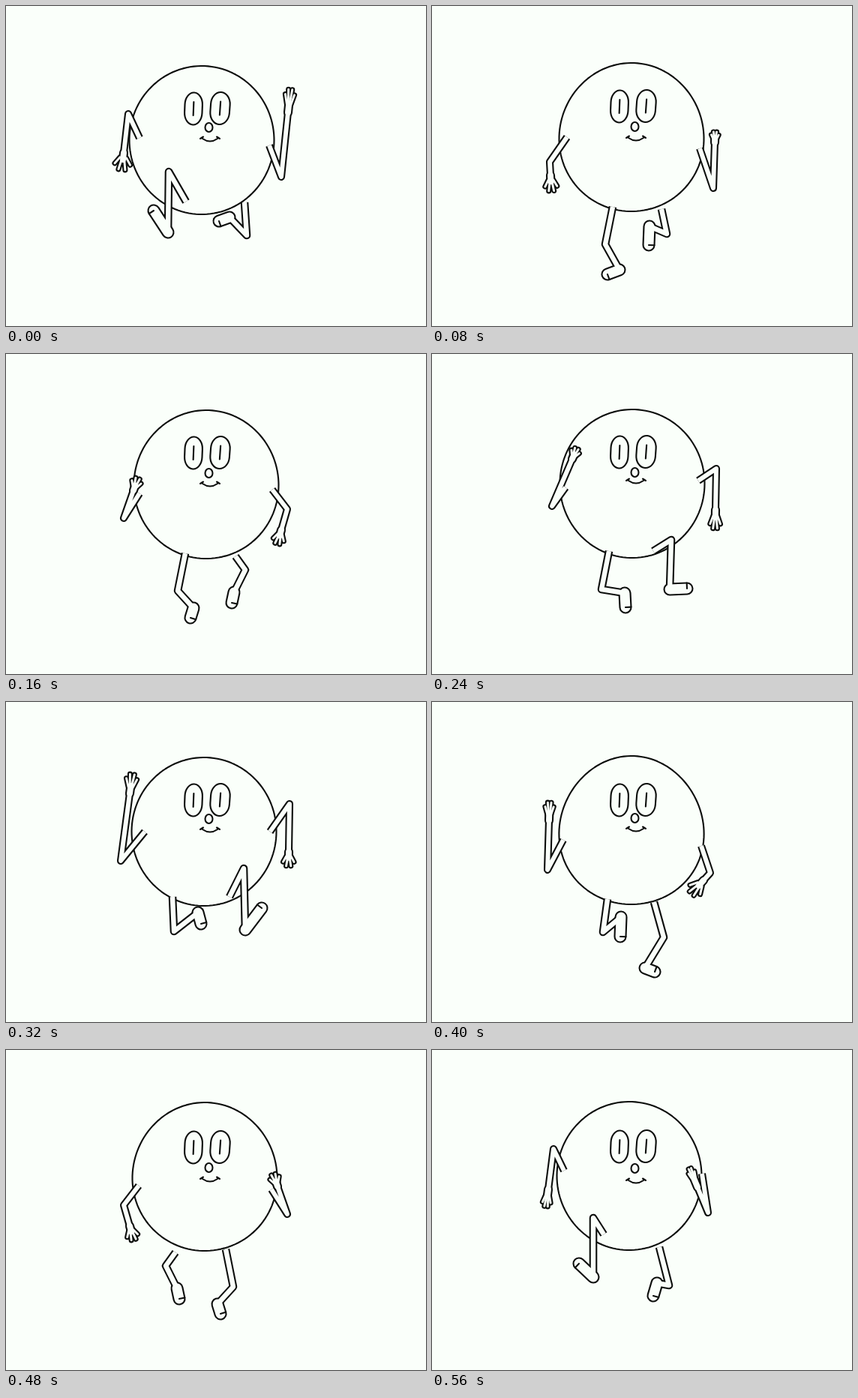
Animation, 560 px wide and 427 px high, one loop 0.64 s. Source, as an HTML page with a canvas:

```html
<!DOCTYPE html>
<html lang="en">
<head>
<meta charset="utf-8">
<title>Running ball</title>
<style>
html, body { margin: 0; width: 100%; height: 100%; overflow: hidden; background: #fafffa; }
canvas { display: block; }
</style>
</head>
<body>
<canvas id="stage" width="560" height="427"></canvas>
<script>
const STEP = 80, PAPER = '#fafffa', INK = '#0c0e0c', LINE = 2.1;
const MIRROR_SUM = 532;
const BODY_RX = 96.5, BODY_RY = 99;
const ARM = 8, PALM = 10, FINGER = 5, LEG = 8.5, FOOT = 15;
const ctx = document.getElementById('stage').getContext('2d');

// body: centre x, centre y, sag    face: height of eyes, nose, mouth
// arms: shoulder, elbow, wrist, hand length, finger spread
// legs: hip, knee, ankle, toe
const poses = [
  {
    body: [261, 179, 0], face: [137, 162, 177],
    arms: [[178, 176, 163, 144, 157, 196, 26, .6], [351, 186, 367, 228, 376, 142, 34, .25]],
    legs: [[240, 261, 217, 221, 216, 302, 197, 273], [318, 262, 321, 306, 298, 282, 284, 287]]
  },
  {
    body: [266, 175, .02], face: [134, 161, 176],
    arms: [[180, 175, 157, 208, 158, 226, 24, .5], [357, 190, 375, 243, 377, 182, 17, .45]],
    legs: [[241, 268, 231, 318, 250, 352, 234, 358], [306, 271, 313, 304, 290, 294, 289, 319]]
  },
  {
    body: [267, 174, .01], face: [132, 159, 173],
    arms: [[178, 186, 157, 219, 170, 182, 20, .5], [355, 181, 375, 207, 367, 235, 22, .5]],
    legs: [[239, 266, 229, 316, 250, 339, 246, 352], [306, 270, 319, 288, 304, 318, 301, 332]]
  },
  {
    body: [267, 173, 0], face: [131, 158, 169],
    arms: [[178, 178, 160, 203, 187, 140, 18, .5], [355, 169, 379, 153, 378, 208, 28, .35]],
    legs: [[236, 263, 226, 314, 257, 319, 258, 338], [295, 263, 319, 248, 317, 314, 340, 313]]
  },
  {
    body: [264, 173, 0], face: [131, 156, 170],
    arms: [[185, 173, 153, 212, 165, 122, 29, .35], [352, 173, 378, 136, 377, 200, 22, .5]],
    legs: [[222, 260, 224, 306, 256, 281, 260, 296], [298, 260, 317, 222, 319, 304, 341, 275]]
  },
  {
    body: [266, 171, .05], face: [131, 155, 169],
    arms: [[175, 184, 154, 224, 156, 158, 27, .3], [359, 192, 371, 228, 362, 238, 27, .5]],
    legs: [[234, 263, 228, 307, 252, 287, 251, 313], [296, 267, 309, 314, 284, 355, 297, 360]]
  },
  {
    body: [265, 169, .02], face: [130, 157, 172]
  },
  {
    body: [263, 168, 0], face: [129, 158, 174],
    arms: [[176, 161, 162, 132, 155, 186, 26, .3], [360, 165, 368, 217, 354, 183, 30, .2]],
    legs: [[229, 246, 215, 224, 215, 303, 196, 285], [303, 263, 316, 314, 300, 311, 295, 328]]
  }
];

// Half a cycle later the same stride is taken by the other side.
const mirrorPoint = (v, i) => i < 6 && i % 2 === 0 ? MIRROR_SUM - v : v;
poses[6].arms = poses[2].arms.map(arm => arm.map(mirrorPoint)).reverse();
poses[6].legs = poses[2].legs.map(leg => leg.map((v, i) => i % 2 ? v : MIRROR_SUM - v)).reverse();

function line(...coords) {
  const path = new Path2D();
  for (let i = 0; i < coords.length; i += 2) path.lineTo(coords[i], coords[i + 1]);
  return path;
}

function ink(path) {
  ctx.fillStyle = PAPER;
  ctx.strokeStyle = INK;
  ctx.lineWidth = LINE;
  ctx.fill(path);
  ctx.stroke(path);
}

// Outlines the union of several thick strokes.
function outline(parts) {
  for (const [colour, grow] of [[INK, LINE], [PAPER, -LINE]]) {
    ctx.strokeStyle = colour;
    for (const { path, width, cap = 'round' } of parts) {
      ctx.lineWidth = width + grow;
      ctx.lineCap = cap;
      ctx.stroke(path);
    }
  }
  ctx.lineCap = 'round';
}

function drawBody([x, y, sag]) {
  const path = new Path2D();
  for (let a = 0; a < 2 * Math.PI; a += .05) {
    path.lineTo(x + BODY_RX * Math.cos(a) * (1 + sag * Math.sin(a)), y + BODY_RY * Math.sin(a));
  }
  path.closePath();
  ink(path);
}

function drawArm([sx, sy, ex, ey, wx, wy, reach, spread]) {
  const aim = Math.atan2(wy - ey, wx - ex);
  const ray = (angle, length) => [wx + length * Math.cos(angle), wy + length * Math.sin(angle)];
  const parts = [
    { path: line(sx, sy, ex, ey, wx, wy), width: ARM, cap: 'butt' },
    { path: line(wx, wy, ...ray(aim, reach * .35)), width: PALM }
  ];
  for (const side of [-1, -.33, .33, 1]) {
    const length = reach * (1 - .2 * side * side) - FINGER / 2;
    const angle = aim + side * spread;
    parts.push({ path: line(...ray(angle, reach * .3), ...ray(angle, length)), width: FINGER });
  }
  outline(parts);
}

function drawLeg([hx, hy, kx, ky, ax, ay, tx, ty]) {
  outline([
    { path: line(hx, hy, kx, ky, ax, ay), width: LEG, cap: 'butt' },
    { path: line(ax, ay, tx, ty), width: FOOT }
  ]);
  const angle = Math.atan2(ty - ay, tx - ax) - Math.PI / 2;
  const edge = FOOT / 2;
  ink(line(tx, ty, tx + edge * Math.cos(angle), ty + edge * Math.sin(angle)));
}

function drawEye(x, y, halfWidth, tilt) {
  const halfHeight = 21.5;
  const eye = new Path2D();
  eye.roundRect(-halfWidth, -halfHeight, 2 * halfWidth, 2 * halfHeight, { x: halfWidth, y: halfHeight * .75 });
  eye.moveTo(0, -9);
  eye.lineTo(0, 9);
  ctx.save();
  ctx.translate(x, y);
  ctx.rotate(tilt);
  ink(eye);
  ctx.restore();
}

function drawFace([eyeY, noseY, mouthY]) {
  drawEye(250, eyeY, 11.7, .04);
  drawEye(285.5, eyeY - .5, 12.8, .07);
  const nose = new Path2D();
  nose.ellipse(270.5, noseY, 5, 6, 0, 0, 2 * Math.PI);
  ink(nose);
  const mouth = new Path2D();
  mouth.moveTo(262, mouthY);
  mouth.quadraticCurveTo(272, mouthY + 7, 282, mouthY);
  for (const side of [-1, 1]) {
    mouth.moveTo(272 + side * 13, mouthY);
    mouth.lineTo(272 + side * 9, mouthY - 2.5);
  }
  ctx.stroke(mouth);
}

function draw() {
  const pose = poses[Math.floor(performance.now() / STEP) % poses.length];
  ctx.fillStyle = PAPER;
  ctx.fillRect(0, 0, 560, 427);
  ctx.lineCap = ctx.lineJoin = 'round';
  drawBody(pose.body);
  pose.legs.forEach(drawLeg);
  pose.arms.forEach(drawArm);
  drawFace(pose.face);
  requestAnimationFrame(draw);
}
draw();
</script>
</body>
</html>
```
